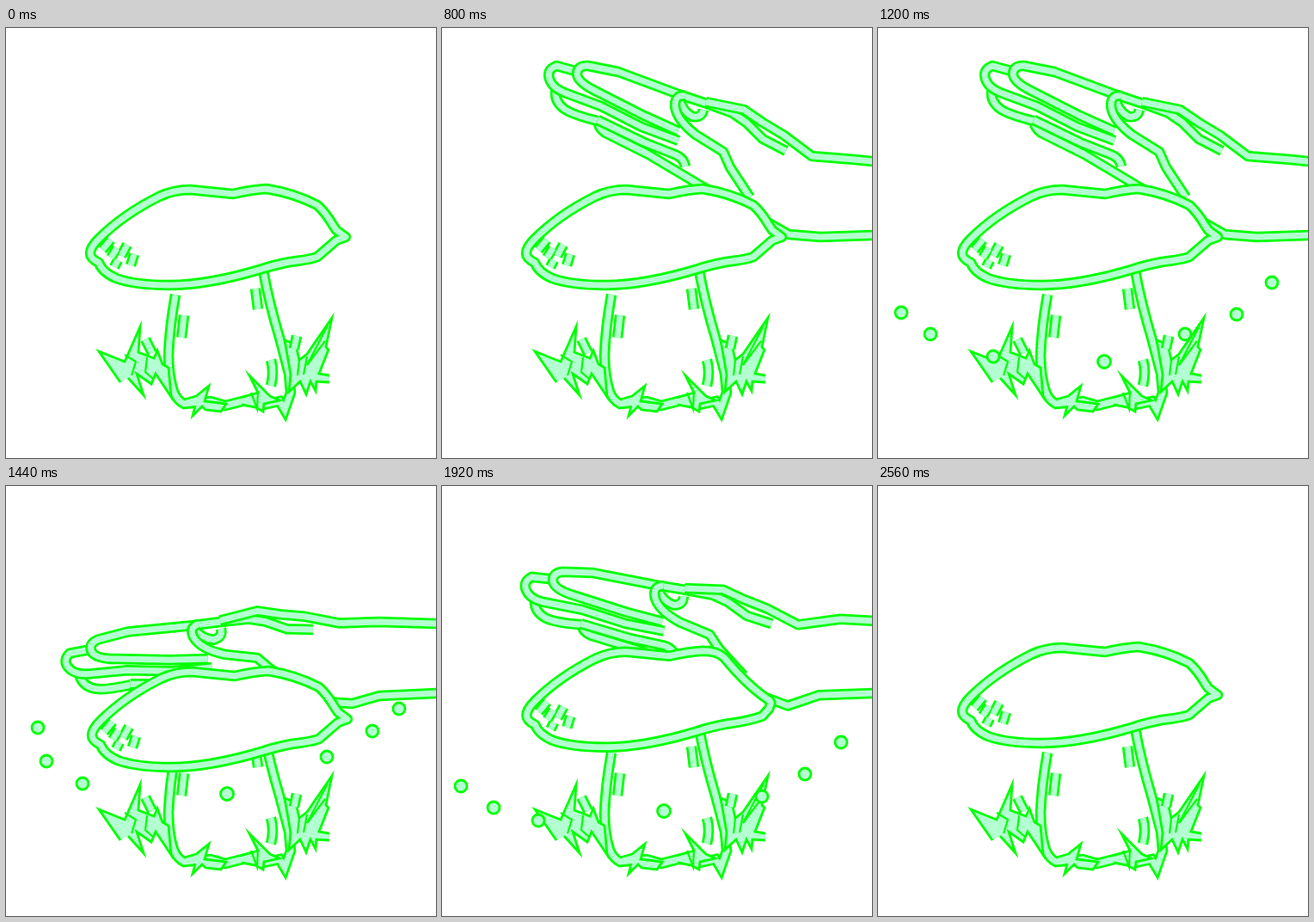
An HTML page that plays this animation: 500 by 500 pixels, repeating every 2640 ms.

```html
<!DOCTYPE html>
<html lang="en">
<head>
<meta charset="utf-8">
<title>Mushroom pat</title>
<style>
html, body { margin: 0; width: 100%; height: 100%; overflow: hidden; background: #fff; }
svg { display: block; width: 100vw; height: 100vh; }
path { fill: none; }
.edge { stroke: #0f0; stroke-width: 12.5; }
.core { stroke: #b3ffd1; stroke-width: 7; }
#hand, #capLine { stroke-linejoin: round; }
.grass, circle { fill: #b3ffd1; stroke: #0f0; stroke-width: 2.8; }
.blade { stroke: #0f0; stroke-width: 2.2; }
</style>
</head>
<body>
<svg viewBox="0 0 500 500">
  <g id="stem"></g>
  <g id="hand"></g>
  <g id="cap">
    <path id="capFill" style="fill:#fff"/>
    <g id="capLine"></g>
    <g id="capMarks"></g>
  </g>
  <g id="grass" stroke-miterlimit="12">
    <path class="grass" d="M133 412L108 376L138 388L156 347L154 377L172 384L176 375L182 391L189 395L192 429L174 402L169 414L152 402L160 427L142 407"/>
    <path class="blade" d="M138 380L151 388L146 404M164 383L162 400L171 408"/>
    <path class="grass" d="M207 432L221 428L236 416L231 434L256 437L250 446L232 444L228 440L217 451L220 439"/>
    <path class="grass" d="M273 430L293 424L283 404L307 428L318 433L300 437L299 446L290 441L274 438"/>
    <path class="blade" d="M285 424L292 443L293 422"/>
    <path class="grass" d="M376 412L361 411L360 422L354 411L349 426L342 411L329 423L331 403L324 363L337 368L341 386L350 379L379 337L372 371L375 374L364 402L376 404"/>
    <path class="blade" d="M374 346L350 392L371 364M341 386L339 404M350 382L346 403"/>
  </g>
  <g id="tufts"></g>
  <g id="dots"></g>
</svg>
<script>
const LOOP = 2640, STEP = 80;
const $ = id => document.getElementById(id);
const mix = (a, b, k) => a + (b - a) * k;
const clamp = v => Math.max(0, Math.min(1, v));

function add(parent, tag, attrs) {
  const el = document.createElementNS('http://www.w3.org/2000/svg', tag);
  for (const k in attrs) el.setAttribute(k, attrs[k]);
  return parent.appendChild(el);
}

// A tube is a green line with a pale core; the returned function reshapes it.
function tube(id, d = '') {
  const lines = ['edge', 'core'].map(c => add($(id), 'path', { class: c, d }));
  return s => lines.forEach(l => l.setAttribute('d', s));
}

// Apply a point function to every "x y" pair in path data.
const warp = (d, fn) => d.replace(/(-?[\d.]+) (-?[\d.]+)/g,
  (m, x, y) => fn(+x, +y).map(v => v.toFixed(2)).join(' '));

function turn(x, y, cx, cy, deg) {
  const a = deg * Math.PI / 180, c = Math.cos(a), s = Math.sin(a);
  return [cx + (x - cx) * c - (y - cy) * s, cy + (x - cx) * s + (y - cy) * c];
}

tube('stem', 'M197 310Q190 350 189 380Q189 405 195 423Q199 433 207 437L238 434L255 439' +
  'L287 431L300 438L318 434L324 444L331 424L329 402L318 360Q306 320 299 282');
tube('stem', 'M207 334L204 360M290 303L293 327M308 386Q312 400 308 416');
tube('tufts', 'M338 358L335 373M162 362L170 378');
tube('capMarks', 'M122 246L112 258M129 256L122 267M130 270L126 278M141 252L134 265M149 263L145 276');
const drawCap = tube('capLine');

// Back to front; the heel and wrist lines run on into the forearm.
const HEEL = 'M181 106Q181 116 190 122L240 147L272 166L302 184L345 207L403 240';
const WRIST = 'M307 86L351 95L373 110L398 125L430 149';
const FINGERS = [
  'M133 70Q129 84 142 94Q152 101 181 108',
  'M181 107L235 133L268 146Q281 150 283 161',
  'M155 50L133 44Q120 49 126 62Q130 70 142 75L185 91L232 115L275 131',
  'M275 120L235 102L180 74Q157 63 157 53Q158 43 170 44L205 51L275 77L305 87L338 99L354 110L373 129L400 143'
];
const THUMB = [
  'M276 82Q279 96 291 103Q302 105 304 95',
  'M283 79Q271 77 271 90Q272 106 295 124L327 144L335 162L358 197'
];
const handTubes = [HEEL, ...FINGERS, WRIST, ...THUMB].map(() => tube('hand'));

function hand(p, swing) {
  const palm = (x, y) => {
    const [u, v] = turn(x, y, 431, 248, -25.9 * p);
    return [u, v + 12 * Math.sin(Math.PI * p)];
  };
  const bend = d => warp(d, palm);
  const low = `L${mix(440, 434, p)} ${mix(243, 244, p)}L500 241L640 239`;
  const top = `L${mix(480, 433, p)} ${mix(153, 158, p)}L500 ${mix(155, 160, p)}L640 160`;
  const lines = [bend(HEEL) + low, ...FINGERS.map(bend), bend(WRIST) + top, ...THUMB.map(bend)];
  lines.forEach((d, i) => handTubes[i](warp(d, (x, y) => turn(x, y, 517, 447, swing))));
}

function cap(p) {
  const sink = 28 * Math.max(0, (p - 0.23) / 0.77);
  const tuck = clamp(1 - Math.abs(p - 0.36) / 0.12);
  const at = (x, y, u, v) => `${mix(x, u, tuck)} ${mix(y, v, tuck)}`;
  const d = `M98 262Q98 255 108 245C125 228 150 210 178 196Q195 188 214 188L264 193Q285 188 303 187` +
    `Q${at(335, 192, 320, 187)} ${at(362, 206, 328, 195)}Q${at(372, 215, 355, 228)} ${at(380, 229, 381, 245)}` +
    `L${at(384, 235, 382, 248)}L${at(395, 243, 381, 251)}L${at(384, 247, 380, 254)}` +
    `L${at(362, 266, 372, 263)}Q355 269 330 272Q310 276 298 280Q235 299 190 299Q150 299 128 291` +
    `Q112 284 108 273Q98 268 98 262Z`;
  $('capFill').setAttribute('d', d);
  drawCap(d);
  $('cap').setAttribute('transform', `translate(${sink / 14} ${sink})`);
}

// Each spore: rising, peak and falling positions.
const SPORES = [
  [27, 331, 37, 281, 22, 349],
  [61, 356, 47, 320, 60, 374],
  [134, 382, 89, 346, 112, 389],
  [263, 388, 257, 358, 258, 378],
  [357, 356, 373, 315, 372, 361],
  [417, 333, 426, 285, 422, 335],
  [458, 296, 457, 259, 464, 298]
];
const dots = SPORES.map((s, i) => add($('dots'), 'circle', { r: i === 3 ? 7.5 : 7 }));

// Parabola through values at 1200, 1440 and 1920 ms.
function arc(a, b, c, t) {
  const u = (t - 1200) / 240;
  return a * (u - 1) * (u - 3) / 3 - b * u * (u - 3) / 2 + c * u * (u - 1) / 6;
}

function spores(t) {
  $('dots').style.display = t >= 1120 && t <= 2320 ? '' : 'none';
  SPORES.forEach(([ax, ay, bx, by, cx, cy], i) => {
    let x, y;
    if (t < 1200) {
      const k = (1200 - t) / 80 * 0.15;
      x = mix(ax, 250, k);
      y = mix(ay, 395, k);
    } else if (t <= 1920) {
      x = arc(ax, bx, cx, t);
      y = arc(ay, by, cy, t);
    } else {
      const k = (t - 1920) / 400;
      x = cx + (cx - 250) * 0.1 * k;
      y = cy + 90 * k;
    }
    dots[i].setAttribute('cx', x);
    dots[i].setAttribute('cy', y);
  });
}

// Three pats, 400 ms each, between 800 and 2000 ms.
const PAT = [0, 0.12, 0.55, 1, 0.36, 0];
function press(t) {
  if (t < 800 || t >= 2000) return 0;
  const u = (t % 400) / 80, i = Math.floor(u);
  return mix(PAT[i], PAT[i + 1], u - i);
}

function render(t) {
  const p = press(t);
  const away = t < 1200 ? clamp(1 - t / 720) : clamp((t - 2000) / 560);
  hand(p, 42 * away ** 1.33);
  $('hand').style.display = away === 1 ? 'none' : '';
  cap(p);
  spores(t);
}

const start = performance.now();
function tick() {
  const t = (performance.now() - start) % LOOP;
  render(Math.floor(t / STEP) * STEP);
  requestAnimationFrame(tick);
}
tick();
</script>
</body>
</html>
```
